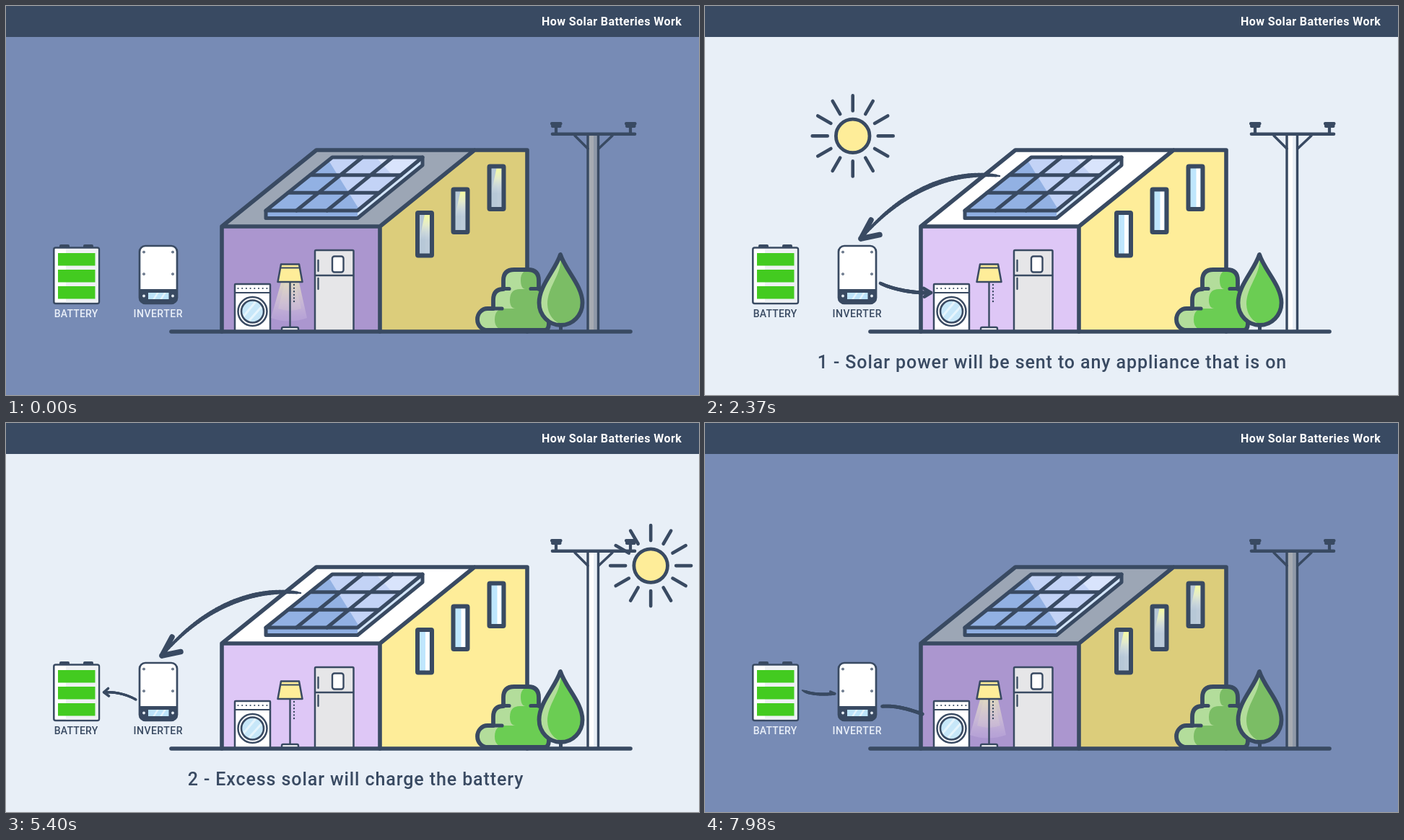
Write an HTML page with a canvas that moves like this. It is 960 by 540 pixels and loops after 8000 ms.

```html
<!DOCTYPE html>
<html lang="en">
<head>
<meta charset="utf-8">
<title>How Solar Batteries Work</title>
<style>
html, body { margin: 0; width: 100%; height: 100%; overflow: hidden; background: #e8eff7; }
canvas { display: block; }
</style>
</head>
<body>
<canvas id="stage" width="960" height="540"></canvas>
<script>
const LOOP = 8000;
const INK = '#394a62', WHITE = '#ffffff', CREAM = '#feed99', LEAF = '#b3dd9b';
const stage = document.getElementById('stage').getContext('2d');
const layer = document.createElement('canvas');
layer.width = 960;
layer.height = 540;
const layerCtx = layer.getContext('2d');
let c = stage;
let night = 0, lamp = 0;

const ramp = (t, a, b) => Math.min(1, Math.max(0, (t - a) / (b - a)));
const smooth = u => u * u * (3 - 2 * u);
const fade = (t, a, b) => smooth(ramp(t, a, b));

function mix(a, b, u) {
  const part = (s, i) => parseInt(s.slice(i, i + 2), 16);
  const ch = i => Math.round(part(a, i) + (part(b, i) - part(a, i)) * u);
  return `rgb(${ch(1)},${ch(3)},${ch(5)})`;
}
const shade = (day, dark) => mix(day, dark, night);

function shape(d, fill, width, stroke = INK) {
  const p = new Path2D(d);
  if (fill) { c.fillStyle = fill; c.fill(p); }
  if (width) { c.strokeStyle = stroke; c.lineWidth = width; c.stroke(p); }
}

function box(x, y, w, h, r, fill, width) {
  c.beginPath();
  c.roundRect(x, y, w, h, r);
  if (fill) { c.fillStyle = fill; c.fill(); }
  if (width) { c.strokeStyle = INK; c.lineWidth = width; c.stroke(); }
}

function disc(x, y, r, fill, width) {
  c.beginPath();
  c.arc(x, y, r, 0, Math.PI * 2);
  if (fill) { c.fillStyle = fill; c.fill(); }
  if (width) { c.strokeStyle = INK; c.lineWidth = width; c.stroke(); }
}

function clipped(d, draw) {
  c.save();
  c.clip(new Path2D(d));
  draw();
  c.restore();
}

function label(text, x, y, font, spacing, color, align = 'center', alpha = 1) {
  if (alpha <= 0) return;
  c.globalAlpha = alpha;
  c.font = font + ' Roboto, sans-serif';
  c.letterSpacing = spacing + 'px';
  c.textAlign = align;
  c.fillStyle = color;
  c.fillText(text, x, y);
  c.globalAlpha = 1;
}

// Sun stops: time, x, y
const SUN = [
  [700, -90, 392], [1410, 30, 296], [3300, 405, 107], [3855, 548, 92],
  [4410, 690, 108], [5400, 893, 198], [6650, 1026, 290]
];

function sunAt(t, k) {
  const last = SUN.length - 1;
  const slope = i => (SUN[i + 1][k] - SUN[i][k]) / (SUN[i + 1][0] - SUN[i][0]);
  const tangent = i => {
    if (i === 0) return slope(0);
    if (i === last) return slope(last - 1) * 0.4;
    const before = SUN[i][0] - SUN[i - 1][0], after = SUN[i + 1][0] - SUN[i][0];
    return (slope(i - 1) * after + slope(i) * before) / (before + after);
  };
  let i = 0;
  while (i < last - 1 && t > SUN[i + 1][0]) i++;
  const h = SUN[i + 1][0] - SUN[i][0], u = (t - SUN[i][0]) / h, v = 1 - u;
  return SUN[i][k] * (1 + 2 * u) * v * v + tangent(i) * h * u * v * v +
    SUN[i + 1][k] * u * u * (3 - 2 * u) - tangent(i + 1) * h * u * u * v;
}

function sun(t) {
  if (t < SUN[0][0] || t > SUN[SUN.length - 1][0]) return;
  c.save();
  c.translate(sunAt(t, 1), sunAt(t, 2));
  disc(0, 0, 23.3, CREAM, 4.8);
  for (let i = 0; i < 12; i++) {
    shape('M35 0H56', null, 4.6);
    c.rotate(Math.PI / 6);
  }
  c.restore();
}

function house() {
  shape('M518 306L649 200H722V452H518Z', shade(CREAM, '#dccd7b'));
  shape('M299 306H518V452H299Z', shade('#dec7f6', '#ab96cf'));
  shape('M299 306L430 200H649L518 306Z', shade(WHITE, '#9ca6b5'));
  [[570, 287], [619.5, 254.5], [669.5, 222.5]].forEach(([x, y]) => houseWindow(x, y));
  solarPanel();
}

function houseFrame() {
  shape('M299 452V306L430 200H722V452M299 306H518V452M518 306L649 200', null, 5.6);
}

function houseWindow(x, y) {
  box(x, y, 20, 60, 1, shade('#bfe6fd', '#b7c8d7'));
  c.fillStyle = shade('#ffffff', '#bccbd9');
  c.fillRect(x + 11, y, 5.5, 60);
  c.globalAlpha = lamp;
  const glow = c.createLinearGradient(0, y + 3, 0, y + 38);
  glow.addColorStop(0, 'rgba(246,252,160,1)');
  glow.addColorStop(0.4, 'rgba(238,243,200,.8)');
  glow.addColorStop(1, 'rgba(220,230,240,0)');
  c.fillStyle = glow;
  c.fill(new Path2D(`M${x + 10} ${y + 3}H${x + 17}V${y + 40}H${x + 2}Z`));
  c.globalAlpha = 1;
  box(x, y, 20, 59.5, 1, null, 6);
}

function solarPanel() {
  const face = 'M452 210H577L487 284H360Z';
  shape('M360 284H487V294.5H360Z', '#8fafe2');
  shape('M487 284L577 210V221L487 294.5Z', '#d3e5fa');
  clipped(face, () => {
    shape(face, '#92b1e3');
    shape('M441 205L494 290H600V205Z', '#c3d3f6');
    shape('M508 205L560 262H600V205Z', '#d9e4fc');
    shape('M486 290L516 255L528 290Z', '#d0ddf9');
  });
  shape('M360 284V294.5H487L577 221V210', null, 5);
  shape(face, null, 5.2);
  let grid = '';
  for (let i = 1; i < 3; i++) {
    const u = i / 3;
    grid += `M${452 + 125 * u} 210L${360 + 127 * u} 284`;
    grid += `M${452 - 92 * u} ${210 + 74 * u}L${577 - 90 * u} ${210 + 74 * u}`;
  }
  shape(grid, null, 5);
}

function washer() {
  box(317, 386, 49, 66, 1, WHITE, 2.5);
  shape('M317 398H366', null, 2.2);
  for (let i = 0; i < 8; i++) disc(321.5 + i * 5.7, 392, 1.1, INK);
  disc(341.5, 424, 20, WHITE, 2.5);
  disc(341.5, 424, 15.5, '#c7e7f9');
  c.save();
  c.beginPath();
  c.arc(341.5, 424, 15.5, 0, Math.PI * 2);
  c.clip();
  shape('M328 432L348 408M334 440L357 414', null, 3, '#e6f5fd');
  c.restore();
  disc(341.5, 424, 15.5, null, 2.6);
}

function floorLamp() {
  if (lamp > 0) {
    c.globalAlpha = lamp;
    const glow = c.createLinearGradient(0, 383, 0, 438);
    glow.addColorStop(0, 'rgba(240,238,185,.72)');
    glow.addColorStop(0.55, 'rgba(225,212,220,.5)');
    glow.addColorStop(1, 'rgba(205,185,230,.28)');
    shape('M381 384H406L417 433Q392 442 367 433Z', glow);
    shape('M386 384H401L409 420Q393 426 377 420Z', 'rgba(240,235,200,.16)');
    c.globalAlpha = 1;
  }
  shape('M393.5 383V446', null, 2.4);
  c.setLineDash([0.2, 4.4]);
  shape('M399 387V412', null, 2.3);
  c.setLineDash([]);
  shape('M382 451V448Q382 446 384 446H403Q405 446 405 448V451Z', WHITE, 2.4);
  shape('M381 358.5H406L410.5 383H376.5Z', CREAM, 2.5);
  shape('M380 363.5H407', null, 2.2);
}

function fridge() {
  box(428, 339, 53.5, 113, 1.5, '#e6e6e8', 2.5);
  shape('M428 374H481M432.5 353V368M432.5 378V393', null, 2.3);
  box(452, 347.5, 15.5, 22, 3, WHITE, 2.4);
}

function powerPole() {
  shape('M806 180H820V452H806Z', shade(WHITE, '#a6abb2'));
  shape('M814 180H820V452H814Z', shade('#e9eff6', '#8f99a8'));
  shape('M806 452V180M820.5 452V180', null, 3.4);
  shape('M788 180L806 198M840 180L821 198', null, 3.5);
  shape('M757 177.8H871', null, 4.6);
  for (const x of [762, 865]) {
    shape(`M${x} 167V176`, null, 4.2);
    box(x - 8, 161, 16.5, 4.6, 2, INK);
    box(x - 7, 164, 14.5, 5, 2, INK);
  }
}

function plants() {
  const green = shade('#6bcd53', '#7bbd65');
  const bush = 'M748 450H667A14 15 0 0 1 667 420H675V408Q675 393 689 393V381Q689 366 704 366H723Q738 366 738 381V393Q752 395 752 410V440Q752 450 746 450Z';
  shape(bush, LEAF);
  clipped(bush, () => {
    shape('M728 366Q713 366 713 380Q713 393 720 393H712Q698 393 698 408Q698 420 706 420H691Q677 420 677 435Q677 450 692 450H760V366Z', green);
  });
  shape(bush, null, 5.8);
  shape('M675 420H687M689 392.5H697M727 392.5H738', null, 5.2);

  const tree = 'M768 345C761 367 738.5 388 738.5 412A30 31 0 0 0 798.5 412C798.5 388 775 367 768 345Z';
  shape('M768.5 443V451', null, 5);
  shape(tree, LEAF);
  clipped(tree, () => {
    shape('M768 345C772 372 750 388 750 414Q751 436 772 443H805V345Z', green);
  });
  shape(tree, null, 5.8);
}

function battery() {
  box(74, 331, 14, 6, 2, INK);
  box(107, 331, 14, 6, 2, INK);
  box(66.3, 335.5, 62.7, 77.5, 2.5, WHITE, 2.5);
  c.fillStyle = '#eef1f4';
  c.fillRect(83, 337, 44.5, 74.5);
  for (let i = 0; i < 3; i++) {
    c.fillStyle = '#43cb20';
    c.fillRect(72, 343 + i * 23, 51.5, 17.5);
  }
}

function inverter() {
  box(185, 333, 52, 80, 8, WHITE);
  shape('M185 393H237V405Q237 413 229 413H193Q185 413 185 405Z', INK);
  box(185, 333, 52, 80, 8, null, 2.7);
  for (const x of [191, 231]) {
    for (const y of [341.5, 372]) disc(x, y, 1.3, '#d8dfe8', 1.1);
    disc(x, 402.5, 1.9, '#e8eff7');
  }
  const screen = 'M197 398H225.5V407H197Z';
  shape(screen, '#bde4fb');
  clipped(screen, () => shape('M204 408L211 397M214 408L221 397', null, 2.5, '#e4f4fe'));
}

// Arrows: cubic curve [x0,y0 .. x3,y3], tip, barb ends, stroke widths
const ARROWS = {
  panel: {
    curve: [408, 236, 330, 226, 262, 268, 217, 322],
    tip: [216, 323], barbs: [[230, 297], [242, 317.5]], headWidth: 7.5,
    width: u => 2.5 + 4.2 * Math.pow(Math.sin(Math.PI * Math.pow(u, 0.65)), 0.7)
  },
  house: {
    curve: [243, 385, 260, 393, 285, 398, 306, 398],
    tip: [313, 398], barbs: [[303, 392], [304, 403.5]], headWidth: 4.8,
    width: u => 4.6 + u * 0.5
  },
  charge: {
    curve: [180, 384, 166, 376, 150, 373, 136, 373.8],
    tip: [135.5, 373.8], barbs: [[141.5, 368.5], [142.5, 379]], headWidth: 3.6,
    width: u => 3.2 + u * 0.3
  },
  drain: {
    curve: [134.5, 371, 148, 377.5, 165, 377, 179.5, 375.8],
    tip: [180, 375.7], barbs: [[173, 372.5]], headWidth: 3,
    width: u => Math.min(4, 1.5 + u * 20)
  },
  supply: {
    curve: [245.5, 393.3, 264, 392, 282, 397, 301, 404],
    tip: [301, 404], barbs: [], headWidth: 5,
    width: () => 4.8
  }
};

function arrow(a, p, alpha = 1) {
  if (p <= 0 || alpha <= 0) return;
  c = layerCtx;
  c.clearRect(0, 0, 960, 540);
  c.lineCap = c.lineJoin = 'round';
  c.strokeStyle = INK;
  const k = a.curve;
  const at = (u, i) => {
    const v = 1 - u;
    return v * v * v * k[i] + 3 * v * v * u * k[i + 2] + 3 * v * u * u * k[i + 4] + u * u * u * k[i + 6];
  };
  const end = Math.min(1, p / 0.8), steps = 48;
  for (let i = 0; i < steps; i++) {
    const u = end * i / steps, w = end * (i + 1) / steps;
    c.lineWidth = a.width(u);
    c.beginPath();
    c.moveTo(at(u, 0), at(u, 1));
    c.lineTo(at(w, 0), at(w, 1));
    c.stroke();
  }
  const head = ramp(p, 0.8, 1);
  if (head > 0) {
    c.lineWidth = a.headWidth;
    c.beginPath();
    c.moveTo(k[6], k[7]);
    c.lineTo(k[6] + (a.tip[0] - k[6]) * head, k[7] + (a.tip[1] - k[7]) * head);
    for (const [x, y] of a.barbs) {
      c.moveTo(...a.tip);
      c.lineTo(a.tip[0] + (x - a.tip[0]) * head, a.tip[1] + (y - a.tip[1]) * head);
    }
    c.stroke();
  }
  c = stage;
  c.globalAlpha = alpha;
  c.drawImage(layer, 0, 0);
  c.globalAlpha = 1;
}

function arrows(t) {
  arrow(ARROWS.panel, ramp(t, 820, 1220), 1 - fade(t, 6650, 6950));
  arrow(ARROWS.house, ramp(t, 1080, 1500), 1 - ramp(t, 3180, 3420));
  arrow(ARROWS.charge, ramp(t, 3960, 4450), 1 - fade(t, 6650, 6950));
  arrow(ARROWS.drain, ramp(t, 7305, 7990));
  arrow(ARROWS.supply, ramp(t, 7580, 8080));
}

function captions(t) {
  const font = '500 25px';
  label('1 - Solar power will be sent to any appliance that is on', 481, 503, font, 0.9, INK,
    'center', fade(t, 850, 1150) - fade(t, 3400, 3620));
  label('2 - Excess solar will charge the battery', 484.5, 503, font, 0.9, INK,
    'center', fade(t, 3620, 3880) - fade(t, 6650, 6950));
}

function draw(t) {
  night = 1 - fade(t, 0, 780) + fade(t, 7270, 7860);
  lamp = 1 - ramp(t, 0, 780) + ramp(t, 7240, 7840);
  c.lineCap = c.lineJoin = 'round';
  c.fillStyle = shade('#e8eff7', '#778bb5');
  c.fillRect(0, 0, 960, 540);

  sun(t);
  powerPole();
  house();
  washer();
  floorLamp();
  fridge();
  houseFrame();
  plants();
  shape('M229 452H865', null, 5.6);
  battery();
  inverter();
  const ink = mix(INK, '#e9eff8', lamp);
  label('BATTERY', 97, 432, '500 14px', 0.2, ink);
  label('INVERTER', 210.7, 432, '500 14px', 0.5, ink);
  arrows(t);
  captions(t);

  c.fillStyle = INK;
  c.fillRect(0, 0, 960, 43);
  label('How Solar Batteries Work', 742, 27, 'bold 16px', 0.42, WHITE, 'left');
}

function tick() {
  draw(performance.now() % LOOP);
  requestAnimationFrame(tick);
}
tick();
</script>
</body>
</html>
```
